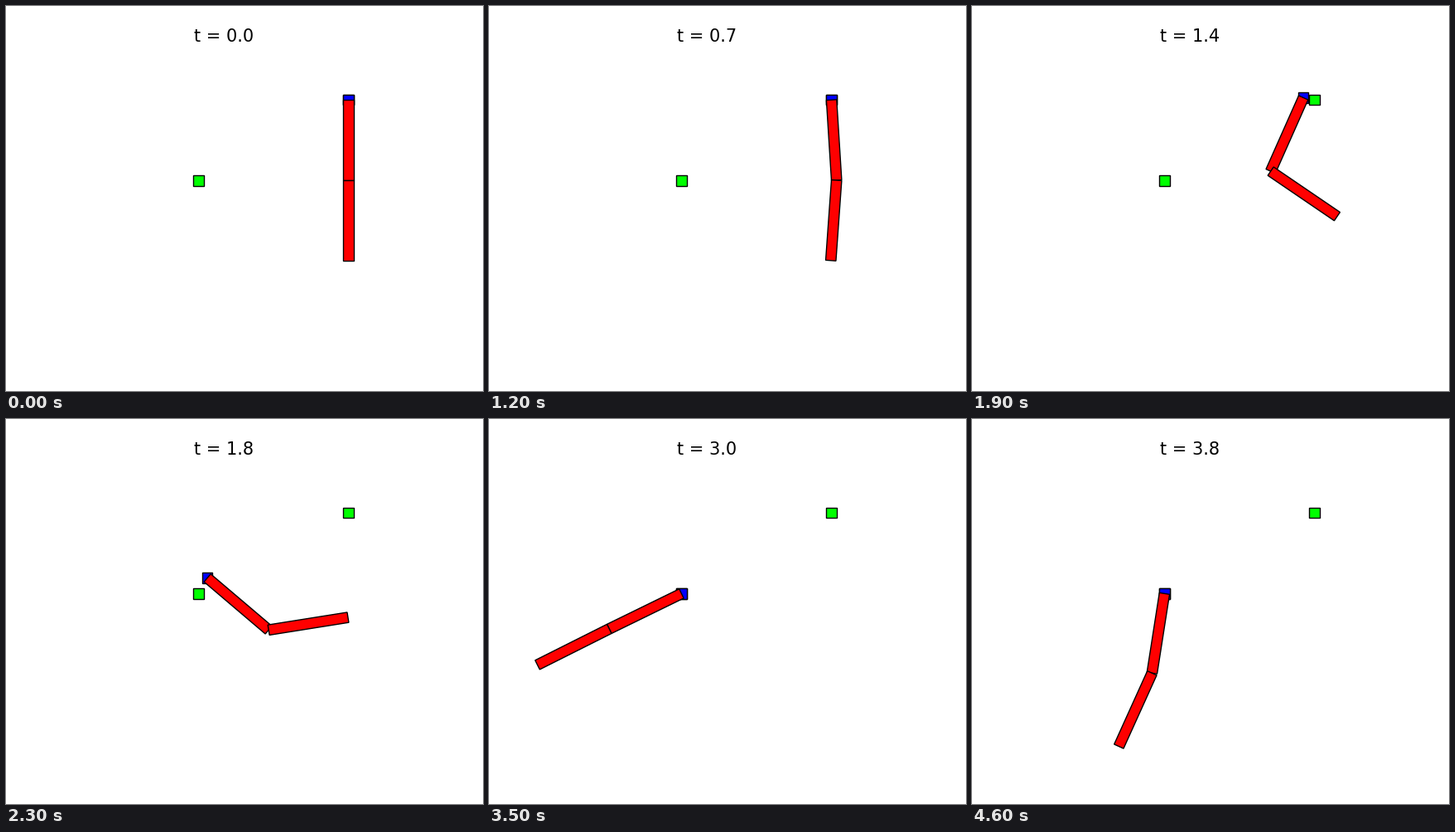
Write a matplotlib script that moves like this. It is 576 by 464 pixels and loops after 4700 ms.

```python
import numpy as np
import matplotlib.pyplot as plt
from matplotlib.animation import FuncAnimation
from matplotlib.patches import Polygon

W, H, DPI = 576, 464, 100
FRAMES, STEP = 47, 100
LINK, THICK = 97.0, 12.4
START, GOAL = np.array([413.6, 113.2]), np.array([232.4, 210.4])
RELEASE, CATCH = 18, 24

# step, upper and lower link angle in degrees from straight down
POSES = np.array([
    (0, 0, 0), (3.5, 2, -2), (6, -1.5, 3), (9, -8, 17), (12, 3.6, -4.1),
    (14.7, 22, -27), (18, -11, 22), (19, -24, 55.8), (20, -14, 75),
    (21, 4, 88), (23, 49.7, 99), (24, 64, 97), (26, 85, 91), (27, 84, 86),
    (29, 57.6, 71.2), (30, 42, 59), (32, -2, 13), (35, -64, -63.4),
    (36, -70, -73), (38, -82, -88), (40, -63, -94), (42, -22, -86),
    (44, -5, -58), (46, -8.9, -24.4),
])
KEYS, ANGLES = POSES[:, 0], POSES[:, 1:]
SLOPES = np.gradient(ANGLES, KEYS, axis=0)


def angles_at(n):
    """Cubic Hermite interpolation of the two link angles, in radians."""
    i = int(np.clip(np.searchsorted(KEYS, n, side="right") - 1, 0, len(KEYS) - 2))
    h = KEYS[i + 1] - KEYS[i]
    s = (n - KEYS[i]) / h
    a = (1 + 2 * s) * (1 - s) ** 2 * ANGLES[i] + s * s * (3 - 2 * s) * ANGLES[i + 1]
    b = h * s * (1 - s) * ((1 - s) * SLOPES[i] - s * SLOPES[i + 1])
    return np.radians(a + b)


def heading(angle):
    return np.array([np.sin(angle), np.cos(angle)])


def hand_at(n, u1, u2):
    if n <= RELEASE:
        return START
    if n >= CATCH:
        return GOAL
    # free flight: the centre of mass follows a parabola
    s = n - RELEASE - 1
    com = np.array([390.6 - 17 * s, 190.6 - 7.95 * s + 4.75 * s * s])
    return com - LINK * (0.75 * u1 + 0.25 * u2)


def bar(p, q, u):
    side = np.array([u[1], -u[0]]) * THICK / 2
    return np.array([p + side, q + side, q - side, p - side])


def square(c):
    r = np.array([0, THICK / 2])
    return bar(c - r, c + r, np.array([0.0, 1.0]))


def clock(n):
    return np.interp(n, [0, 12, 35, 46], [0, 0.7, 3.0, 3.8])


# the tiny margin keeps the pixel size from being rounded down
fig = plt.figure(figsize=((W + 0.001) / DPI, (H + 0.001) / DPI), dpi=DPI,
                 facecolor="white")
ax = fig.add_axes([0, 0, 1, 1])
ax.set_xlim(0, W)
ax.set_ylim(H, 0)
ax.axis("off")


def shape(points, color, z):
    patch = Polygon(points, closed=True, facecolor=color, edgecolor="black",
                    linewidth=1, joinstyle="miter", zorder=z)
    return ax.add_patch(patch)


for spot in (START, GOAL):
    shape(square(spot), "lime", 1)
hand = shape(square(START), "blue", 2)
upper = shape(square(START), "red", 3)
lower = shape(square(START), "red", 4)
label = ax.text(226.6, 43, "", fontsize=15, family="DejaVu Sans",
                ha="left", va="baseline")


def update(n):
    a1, a2 = angles_at(n)
    u1, u2 = heading(a1), heading(a2)
    grip = hand_at(n, u1, u2)
    elbow = grip + LINK * u1
    hand.set_xy(square(grip))
    upper.set_xy(bar(grip, elbow, u1))
    lower.set_xy(bar(elbow, elbow + LINK * u2, u2))
    label.set_text(f"t = {clock(n):.1f}")
    return hand, upper, lower, label


anim = FuncAnimation(fig, update, frames=FRAMES, interval=STEP,
                     repeat=True, repeat_delay=0, blit=False)
plt.show()
```
